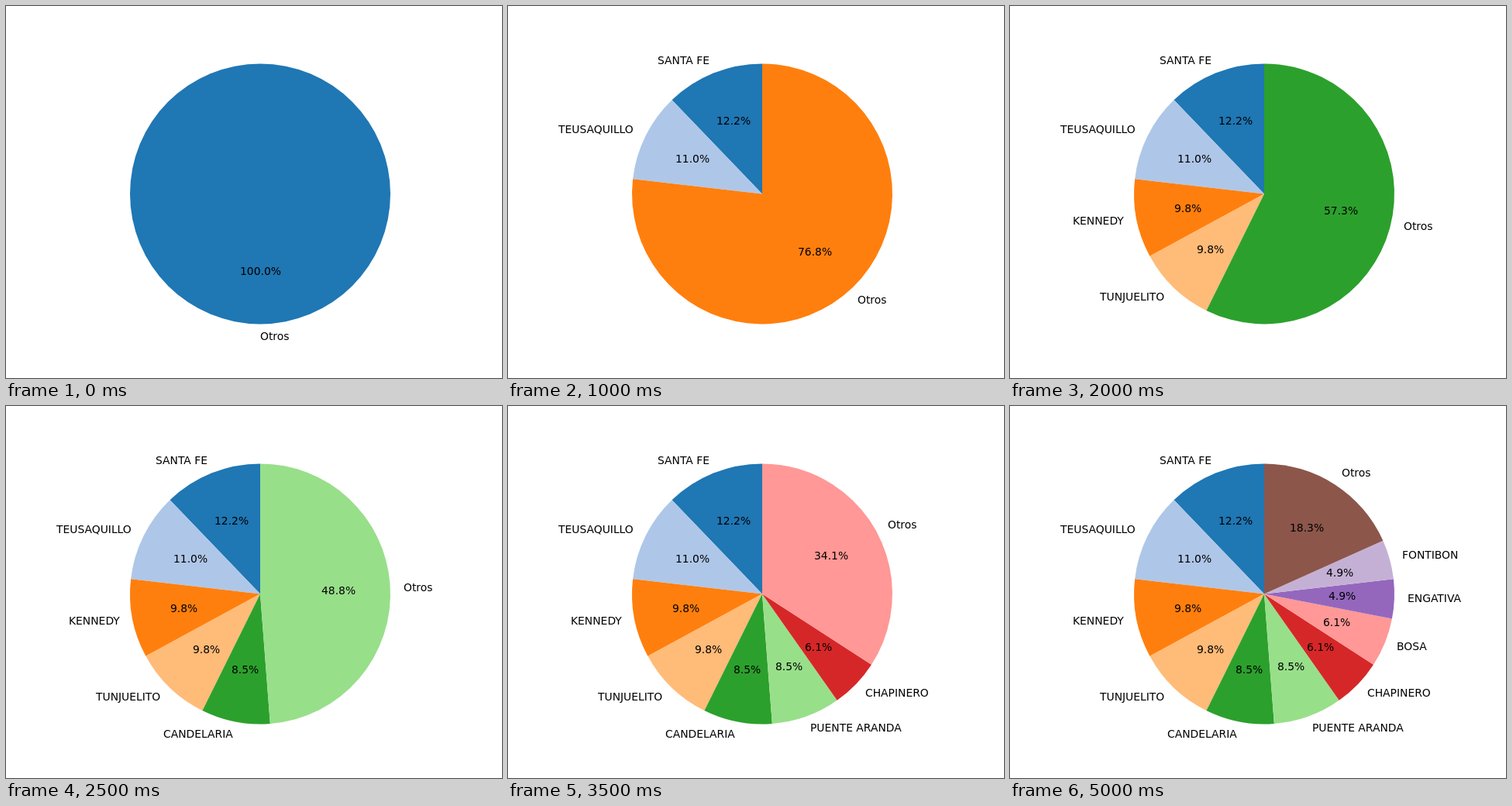
An HTML page with a canvas for the animation above (5.5 s loop, 640x480 px).

```html
<!DOCTYPE html>
<html lang="es">
<head>
<meta charset="utf-8">
<style>
html, body { margin: 0; width: 100%; height: 100%; overflow: hidden; background: #fff; }
canvas { display: block; }
</style>
</head>
<body>
<canvas id="stage" width="640" height="480"></canvas>
<script>
const ctx = document.getElementById('stage').getContext('2d');
const CX = 328, CY = 242.4, R = 168, STEP = 500, TAU = 2 * Math.PI;
const TOTAL = 82;
const areas = [
  ['SANTA FE', 10], ['TEUSAQUILLO', 9], ['KENNEDY', 8], ['TUNJUELITO', 8],
  ['CANDELARIA', 7], ['PUENTE ARANDA', 7], ['CHAPINERO', 5], ['BOSA', 5],
  ['ENGATIVA', 4], ['FONTIBON', 4]
];
const colors = ['#1f77b4', '#aec7e8', '#ff7f0e', '#ffbb78', '#2ca02c', '#98df8a',
  '#d62728', '#ff9896', '#9467bd', '#c5b0d5', '#8c564b'];

// align: 0 = left, 0.5 = centre, 1 = right, measured on the inked width
function write(text, x, y, align) {
  const m = ctx.measureText(text);
  const width = m.actualBoundingBoxLeft + m.actualBoundingBoxRight;
  ctx.fillText(text, Math.round(x - width * align), Math.round(y + 4));
}

// Slices run counterclockwise from the top; the last one holds the remainder.
function drawPie(count) {
  const shown = areas.slice(0, count);
  const rest = shown.reduce((left, [, n]) => left - n, TOTAL);
  let sum = 0;
  const slices = [...shown, ['Otros', rest]].map(([name, n]) => {
    const from = sum / TOTAL * TAU;
    sum += n;
    return { name, n, from, to: sum / TOTAL * TAU };
  });

  ctx.fillStyle = '#fff';
  ctx.fillRect(0, 0, 640, 480);
  slices.forEach(({ from, to }, i) => {
    ctx.fillStyle = colors[i];
    ctx.beginPath();
    if (count) ctx.moveTo(CX, CY);
    ctx.arc(CX, CY, R, -TAU / 4 - from, -TAU / 4 - to, true);
    ctx.fill();
  });

  ctx.fillStyle = '#000';
  ctx.font = '13.889px "DejaVu Sans", sans-serif';
  for (const { name, n, from, to } of slices) {
    const mid = (from + to) / 2;
    const dx = -R * Math.sin(mid), dy = -R * Math.cos(mid);
    write(name, CX + 1.1 * dx, CY + 1.1 * dy, dx > -1e-6 ? 0 : 1);
    write((100 * n / TOTAL).toFixed(1) + '%', CX + 0.6 * dx, CY + 0.6 * dy, 0.5);
  }
}

function tick() {
  drawPie(Math.floor(performance.now() / STEP) % (areas.length + 1));
  requestAnimationFrame(tick);
}
tick();
</script>
</body>
</html>
```
